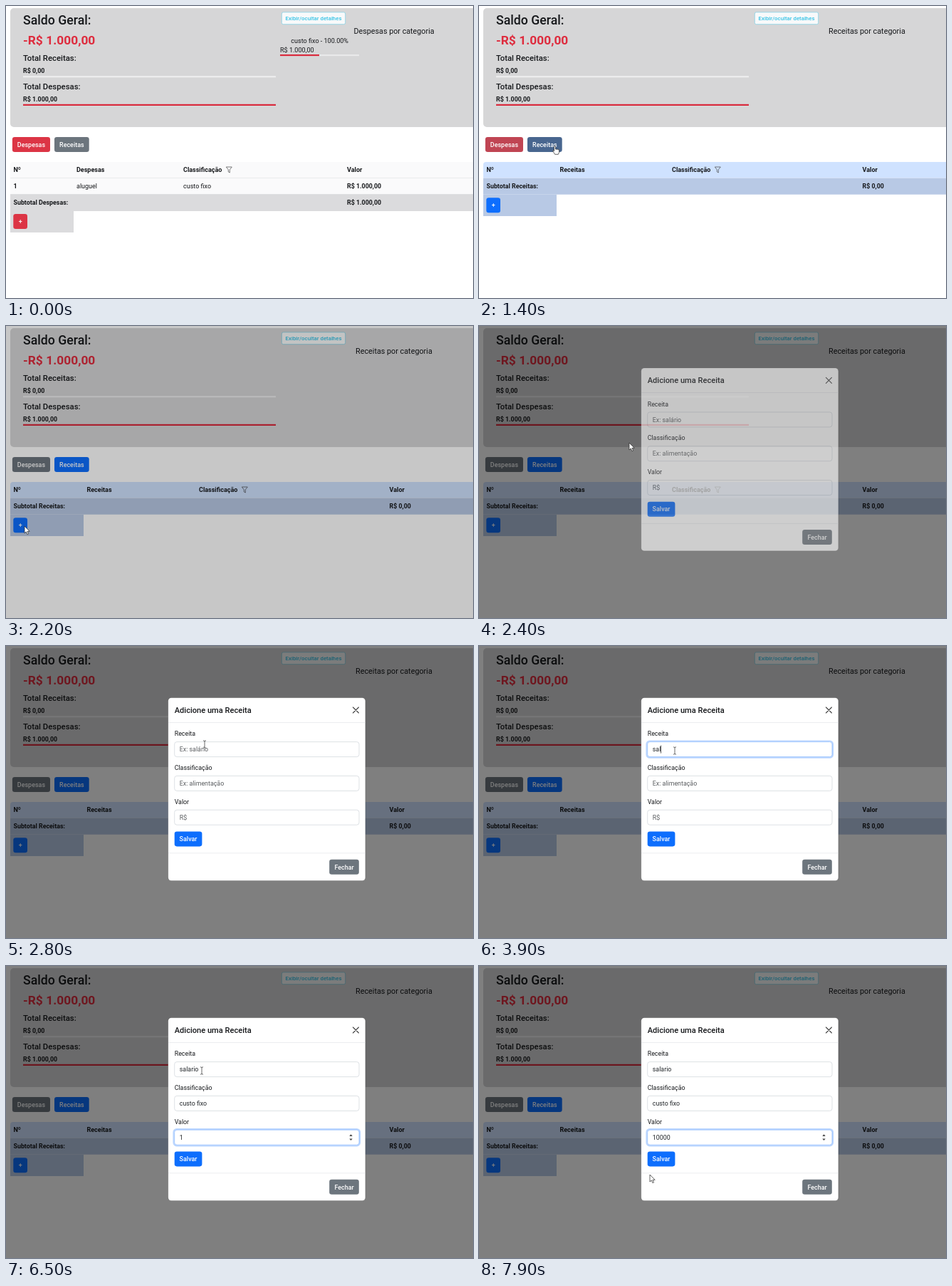
An HTML page that plays this animation: 656x410 px, repeating every 8 s.

```html
<!DOCTYPE html>
<html lang="pt-BR">
<head>
<meta charset="utf-8">
<title>Saldo Geral</title>
<style>
  html, body { margin: 0; width: 100%; height: 100%; overflow: hidden; background: #fff; }
  svg { display: block; width: 656px; height: 410px; font-family: Roboto, Arial, sans-serif; }
  text { white-space: pre; }
</style>
</head>
<body>
<svg id="stage" viewBox="0 0 656 410"></svg>
<script>
const RED = '#dc3545', GREY = '#6c757d', GREY_HOVER = '#5c636a', BLUE = '#0d6efd', INK = '#16181b';
const LOOP = 8000, STEP = 100;

const text = (x, middle, size, str, weight = 400, fill = INK, extra = '') =>
  `<text x="${x}" y="${middle + size * 0.36}" font-size="${size}" font-weight="${weight}" fill="${fill}" ${extra}>${str}</text>`;
const rect = (x, y, x2, y2, fill, r = 0, extra = '') =>
  `<rect x="${x}" y="${y}" width="${x2 - x}" height="${y2 - y}" rx="${r}" fill="${fill}" ${extra}/>`;
const button = (x, y, x2, label, fill, id = '') =>
  rect(x, y, x2, y + 21, fill, 3.3, id && `id="${id}"`) +
  text((x + x2) / 2, y + 10.5, 8.95, label, 500, '#fff', 'text-anchor="middle"');
const funnel = x =>
  `<path d="M${x} 226h8l-3 3.8v4.2l-2-1.2v-3z" fill="none" stroke="#444" stroke-width=".7" stroke-linejoin="round"/>`;
const tableHead = (name, columns) =>
  ['Nº', name, 'Classificação', 'Valor'].map((s, i) => text(columns[i], 230, 9, s, 700)).join('') +
  funnel(columns[2] + 60.3);
const roundedTop = (y2, fill) => `<path d="M6 ${y2}V223q0-4 4-4H656V${y2}z" fill="${fill}"/>`;

const summary =
  rect(6, 3, 670, 170, '#d6d6d7', 5) +
  text(24, 19.5, 17.7, 'Saldo Geral:', 500) +
  text(24, 48, 17.4, '-R$ 1.000,00', 700, '#de2c3e') +
  text(24, 73, 11.35, 'Total Receitas:', 500) +
  text(24, 91.3, 8.86, 'R$ 0,00', 700) +
  rect(24, 98.2, 379, 100.3, '#eeeeef') +
  text(24, 113, 11.35, 'Total Despesas:', 500) +
  text(24, 131, 8.86, 'R$ 1.000,00', 700) +
  rect(24, 137.8, 379, 140, '#d92b3d') +
  rect(387.3, 8.8, 476.7, 25.7, '#f8f9fa', 2.2, 'stroke="#79cfe6" stroke-width=".7"') +
  text(432, 17, 7.8, 'Exibir/ocultar detalhes', 500, '#36c3e6', 'text-anchor="middle"');

const expenses = `<g id="expenses">` +
  text(488.5, 35, 10.75, 'Despesas por categoria') +
  text(400.3, 48.5, 9.05, 'custo fixo - 100.00%') +
  text(385, 61.5, 9.05, 'R$ 1.000,00') +
  rect(385, 68, 496, 70.2, '#e9e9ea') + rect(385, 68, 440, 70.2, '#d92b3d') +
  roundedTop(265, '#fafafb') +
  rect(6, 241.3, 656, 242, '#e4e5e7') + rect(6, 264, 656, 265, '#dddee0') +
  rect(6, 265, 656, 288, '#dbdbdd') + rect(6, 288, 95, 318, '#dbdbdd') +
  tableHead('Despesas', [10.5, 99, 249, 479]) +
  text(10.5, 253, 9, '1', 700) + text(99, 253, 9, 'aluguel') + text(249, 253, 9, 'custo fixo') +
  text(479, 253, 8.86, 'R$ 1.000,00', 700) +
  text(10.5, 275.7, 8.86, 'Subtotal Despesas:', 700) + text(479, 275.7, 8.86, 'R$ 1.000,00', 700) +
  button(10.3, 292, 30, '+', RED) + `</g>`;

const incomes = `<g id="incomes">` +
  text(491, 35, 10.8, 'Receitas por categoria') +
  roundedTop(241.6, '#cfe2ff') +
  rect(6, 241.6, 656, 264.7, '#b8c9e5') + rect(6, 264.7, 109, 295, '#b8c9e5') +
  tableHead('Receitas', [10.5, 113.5, 271, 538.5]) +
  text(10.5, 253, 8.86, 'Subtotal Receitas:', 700) + text(538.5, 253, 8.86, 'R$ 0,00', 700) +
  button(10.3, 269.3, 30, '+', BLUE) + `</g>`;

// Each field: its typed text, key times, and the moment it gains focus
const fields = [
  { label: 'Receita', hint: 'Ex: salário', value: 'salario', focus: 2900,
    keys: [3600, 3700, 3900, 4000, 4200, 4300, 4500] },
  { label: 'Classificação', hint: 'Ex: alimentação', value: 'custo fixo', focus: 4600,
    keys: Array.from('custo fixo', (_, i) => 4800 + i * 55) },
  { label: 'Valor', hint: 'R$', value: '10000', focus: 5450,
    keys: [6000, 6700, 6800, 7000, 7200] },
];
const fieldMarkup = ({ label }, i) => {
  const y = 134.6 + i * 47.8;
  return text(236.7, y - 11.5, 8.86, label) +
    rect(235.5, y - 1.1, 497, y + 22.1, 'none', 4.2, `id="ring${i}" stroke="${BLUE}" stroke-opacity=".28" stroke-width="2.2"`) +
    rect(236.7, y, 496, y + 21, '#fff', 3.3, `id="box${i}" stroke-width=".7"`) +
    text(243.8, y + 10.5, 8.86, '', 400, INK, `id="value${i}"`) +
    rect(0, y + 5, 0.7, y + 16, '#111', 0, `id="caret${i}"`);
};

const modal = `<g id="modal">` +
  rect(227.8, 72.7, 504.8, 329.5, '#fff', 4.4, 'stroke="#000" stroke-opacity=".2" stroke-width=".6"') +
  text(236.7, 90, 11.08, 'Adicione una Receita'.replace('una', 'uma'), 500) +
  `<path d="M487.4 86l8 8m0-8l-8 8" stroke="#444" stroke-width="1.1" stroke-linecap="round"/>` +
  rect(228, 107, 504.6, 107.6, '#dee2e6') + rect(228, 290.6, 504.6, 291.2, '#dee2e6') +
  fields.map(fieldMarkup).join('') +
  `<path id="spinner" d="M482.3 239l2.2-2.7 2.2 2.7zm0 3.4l2.2 2.7 2.2-2.7z" fill="#444"/>` +
  button(236.7, 260.4, 275.4, 'Salvar', BLUE) +
  button(454.2, 299.8, 495.8, 'Fechar', GREY) + `</g>`;

const pointers =
  `<path id="arrow" d="M0 0V10l2.3-2.1 1.6 3.7 1.7-.8-1.6-3.5H7.2z" fill="#fff" stroke="#222" stroke-width=".7"/>` +
  `<path id="hand" d="M-1 1q0-1 1-1t1 1V4.6q4-.3 5.2 1.2.4 3.5-1.4 6H.1Q-1.6 9-3 6.8q.4-1.2 2 .4z" fill="#fff" stroke="#222" stroke-width=".7"/>` +
  `<path id="beam" d="M-2-5.2q2 0 2 1.2 0-1.2 2-1.2M0-4V4M-2 5.2q2 0 2-1.2 0 1.2 2 1.2" fill="none" stroke="#444" stroke-width=".8"/>`;

document.getElementById('stage').innerHTML = summary + expenses + incomes +
  button(8.9, 184, 62, 'Despesas', RED, 'expensesTab') +
  button(68, 184, 116.7, 'Receitas', GREY, 'incomesTab') +
  rect(0, 0, 656, 410, '#000', 0, 'id="backdrop"') + modal + pointers;

const el = id => document.getElementById(id);
const set = (id, attrs) => { for (const name in attrs) el(id).setAttribute(name, attrs[name]); };
const show = (id, on) => set(id, { visibility: on ? 'visible' : 'hidden' });
const ramp = (t, start, length = 150) => Math.min(1, Math.max(0, (t - start) / length));
const mix = (a, b, k) => {
  const channel = (hex, i) => parseInt(hex.slice(i, i + 2), 16);
  return `rgb(${[1, 3, 5].map(i => Math.round(channel(a, i) * (1 - k) + channel(b, i) * k))})`;
};

const SWITCH = 1362, BACKDROP = 2134, MODAL = 2307;

// time, x, y, pointer shape used from then on
const path = [
  [900, 640, 262, 'arrow'], [1100, 330, 226, 'arrow'], [1200, 160, 206, 'arrow'], [1300, 107, 196, 'hand'],
  [1500, 106, 197, 'hand'], [1600, 88, 212, 'arrow'], [1900, 36, 272, 'arrow'], [2000, 26, 281, 'hand'],
  [2200, 26, 281, 'arrow'], [2300, 80, 238, 'arrow'], [2400, 211, 164, 'arrow'], [2500, 256, 143, 'beam'],
  [2600, 265, 137, 'beam'], [2800, 279, 138, 'beam'], [2900, 279, 138, 'beam'], [3000, 275, 147, 'beam'],
  [7400, 275, 147, 'beam'], [7500, 281, 165, 'arrow'], [7600, 286, 212, 'arrow'],
  [7700, 252, 268, 'arrow'], [7800, 220, 288, 'arrow'], [7900, 240, 293, 'arrow'],
];

function drawPointer(t) {
  const i = path.findLastIndex(p => p[0] <= t);
  ['arrow', 'hand', 'beam'].forEach(shape => show(shape, i >= 0 && path[i][3] === shape));
  if (i < 0) return;
  const [start, x, y, shape] = path[i];
  const next = path[i + 1] || path[i];
  const k = ramp(t, start, next[0] - start || 1);
  set(shape, { transform: `translate(${x + (next[1] - x) * k} ${y + (next[2] - y) * k})` });
}

function drawField(field, i, t) {
  const end = fields[i + 1] ? fields[i + 1].focus : Infinity;
  const glow = ramp(t, field.focus) - ramp(t, end);
  const typed = field.keys.filter(key => key <= t).length;
  const value = el('value' + i);
  value.textContent = field.value.slice(0, typed) || field.hint;
  set('value' + i, { fill: typed ? '#212529' : '#595c5f' });
  set('ring' + i, { opacity: glow });
  set('box' + i, { stroke: mix('#ced4da', '#86b7fe', glow) });
  const lastKey = typed ? field.keys[typed - 1] : field.focus;
  show('caret' + i, t > field.focus && t < end && Math.floor((t - lastKey) / 500) % 2 === 0);
  set('caret' + i, { x: 243.8 + (typed ? value.getComputedTextLength() : 0) });
}

function draw(t) {
  const switched = t >= SWITCH, k = ramp(t, SWITCH);
  set('expenses', { display: switched ? 'none' : 'inline' });
  set('incomes', { display: switched ? 'inline' : 'none' });
  set('expensesTab', { fill: mix(RED, GREY, k) });
  set('incomesTab', { fill: switched ? mix(GREY_HOVER, BLUE, k) : mix(GREY, GREY_HOVER, ramp(t, 1250)) });
  set('backdrop', { opacity: ramp(t, BACKDROP) / 2 });

  const slide = (1 - ramp(t, MODAL, 300)) ** 1.9;
  set('modal', { opacity: ramp(t, MODAL), transform: `translate(0 ${-27.7 * slide})` });
  fields.forEach((field, i) => drawField(field, i, t));
  set('spinner', { opacity: t >= fields[2].focus ? 1 : 0 });
  drawPointer(t);
}

const origin = performance.now();
function tick() {
  const t = (performance.now() - origin) % LOOP;
  draw(Math.floor(t / STEP) * STEP);
  requestAnimationFrame(tick);
}
tick();
</script>
</body>
</html>
```
